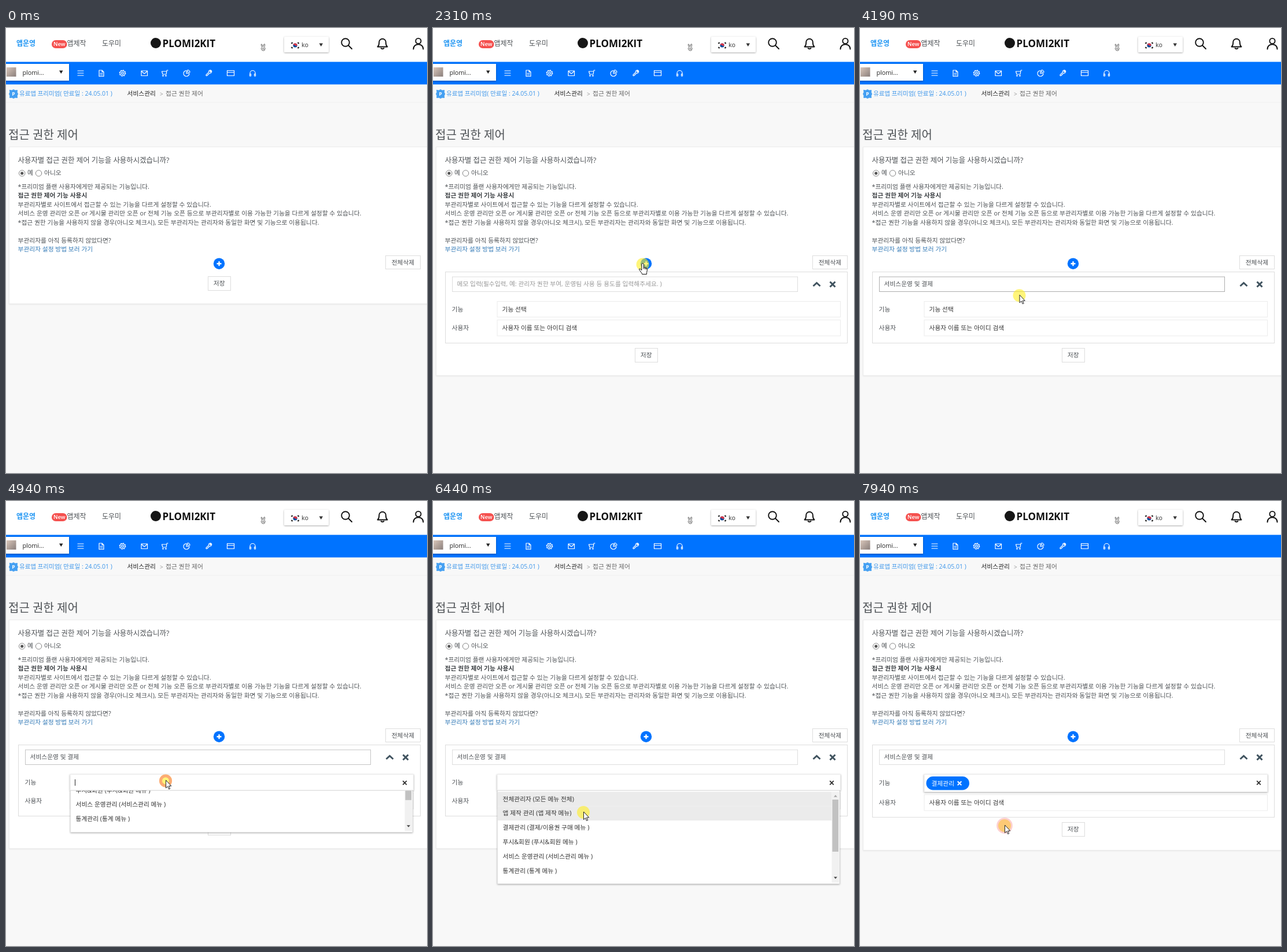
These frames come from a looping animation (728x769 px, 8 s). An HTML page:

```html
<!DOCTYPE html>
<html lang="ko">
<head>
<meta charset="utf-8">
<title>접근 권한 제어</title>
<style>
  html, body { margin: 0; width: 100%; height: 100%; overflow: hidden; background: #f8f8f8; }
  svg { display: block; width: 100%; height: 100%; }
  text { font: 10.74px "Open Sans", "Noto Sans CJK KR", "Noto Sans CJK JP", "Noto Sans KR", sans-serif; fill: #4c5054; white-space: pre; }
  .bold { font-weight: 700; fill: #3c4044; }
  .menu { font-size: 12px; }
  .blue { fill: #3d96ea; }
  .dark { fill: #333; }
  .hint { fill: #999; }
  .mid { text-anchor: middle; }
  .box { fill: #fff; stroke: #ddd; }
  .field { fill: #fff; stroke: #ececec; }
  .lift { filter: drop-shadow(0 1px 1.5px #0005); }
  .line { fill: none; stroke-linecap: round; stroke-linejoin: round; }
  .hover { fill: #ebebeb; }
</style>
</head>
<body>
<svg viewBox="0 0 728 769">
  <defs>
    <clipPath id="dropClip"><rect x="105" y="500.5" width="606" height="172"/></clipPath>
    <linearGradient id="thumb" x2="1" y2="1">
      <stop stop-color="#d9c6ba"/><stop offset="1" stop-color="#8a7f7c"/>
    </linearGradient>
  </defs>
  <rect width="728" height="769" fill="#f8f8f8"/>

  <!-- header -->
  <rect width="728" height="59" fill="#fff"/>
  <text class="menu" x="18" y="31" style="fill:#2196f3;font-weight:700">앱운영</text>
  <rect x="79" y="21" width="26.5" height="14" rx="7" fill="#f5504e"/>
  <text class="mid" x="92.2" y="31.4" style="font-size:9.5px;font-weight:600;fill:#fff">New</text>
  <text class="menu" x="105.5" y="31">앱제작</text>
  <text class="menu" x="166" y="31">도우미</text>
  <circle cx="259" cy="26" r="9" fill="#161616"/>
  <text x="270.5" y="32.5" style="font-size:17px;font-weight:700;fill:#111">PLOMI2KIT</text>
  <path class="line" stroke="#666" d="M442.500 33l-1.500-4.500q.8-1.200 1.800 0l1.700 4 1.500-4.500q1.200-.8 1.800.4l-1 5.100 1.500 1.500-1.500 4h-3.500l-2-3z M443 35.500l3-1.200 M444 37l2.500-.6"/>
  <rect class="lift" x="481" y="15" width="77" height="27" rx="1.5" fill="#fff"/>
  <circle cx="500" cy="30" r="3.6" fill="#0f4c9c"/>
  <path d="M496.4 30a3.6 3.6 0 0 1 7.2 0q-1.8 2-3.6 0t-3.6 0z" fill="#d34"/>
  <path stroke="#222" stroke-width="2.4" d="M493.5 27l2-2M504.5 25l2 2M493.5 33l2 2M504.5 35l2-2"/>
  <text class="dark" x="511" y="32.5">ko</text>
  <path d="M541.5 26.5h6.5l-3.25 5.5z" fill="#333"/>
  <g class="line" stroke="#111" stroke-width="1.9">
    <circle cx="587" cy="25" r="6.8"/><path d="M592 30l6 6"/>
    <path d="M642.5 32.500c3-2.500 2.500-5 2.700-8a5.800 5.800 0 0 1 11.600 0c.2 3-.3 5.500 2.700 8z M648.5 35q2.500 2 5 0"/>
    <circle cx="713" cy="22.5" r="4.6"/><path d="M704.5 36.5c0-11 17-11 17 0"/>
  </g>

  <!-- navigation bar -->
  <rect y="58.5" width="728" height="39" fill="#0073ff"/>
  <rect class="lift" x="-4" y="62" width="113" height="29" fill="#fff"/>
  <rect x="1" y="68" width="16.5" height="16" fill="url(#thumb)"/>
  <text x="28.5" y="80.5" style="fill:#222">plomi...</text>
  <path d="M92 73.5h6.5l-3.25 5.5z" fill="#222"/>
  <g class="line" stroke="#fff" stroke-width="1.2">
    <path d="M124 74h10M124 78h10M124 82h10"/>
    <path d="M161 73h5l3 3v7.5h-8zM166 73v3h3M163 78.5h4M163 81h4"/>
    <circle cx="201.5" cy="78" r="1.9"/><circle cx="201.5" cy="78" r="4.4"/>
    <circle cx="201.5" cy="78" r="5.3" stroke-dasharray="1.8 2.36" stroke-linecap="butt"/>
    <path d="M234 74h10.5v8.5h-10.5zM234 74.5l5.25 4.5 5.25-4.5"/>
    <path d="M280 73h-1.8l-1.2 7h-6l-1.5-5h8"/><circle cx="271.5" cy="82.5" r=".7"/><circle cx="276.5" cy="82.5" r=".7"/>
    <path d="M312 73.5a5 5 0 1 0 5 5h-5zM314 72.5a4 4 0 0 1 4 4h-4z"/>
    <path d="M346 81l4.5-4.5a3 3 0 0 1 4-3.5l-2 2 1 1 2-2a3 3 0 0 1-3.5 4l-4.5 4.5q-2 .5-1.5-1.5z"/>
    <path d="M382.5 73.5h12v9h-12zM382.5 76.5h12"/>
    <path d="M422 80v-2a4.5 4.5 0 0 1 9 0v2M421.5 79.5h2v3.5h-2zM429.5 79.5h2v3.5h-2z"/>
  </g>

  <!-- breadcrumb and title -->
  <path stroke="#f1f1f1" d="M0 128.5H728"/>
  <path class="line" d="M6.5 107.5q3.500 1.500 6.500-1 3 2.500 6.500 1-1.200 3.500 1 6.500-2.200 3-1 6.500-3.500-1.200-6.500 1-3-2.200-6.500-1 1.200-3.500-1-6.500 2.200-3 1-6.500z" style="fill:#45a0f2" stroke="#45a0f2"/>
  <text class="mid" x="13" y="117" style="font-size:8.5px;font-weight:700;fill:#fff">P</text>
  <text class="blue" x="23" y="117" style="font-size:10.5px">유료앱 프리미엄( 만료일 : 24.05.01 )</text>
  <text x="209.5" y="117" style="fill:#222">서비스관리</text>
  <text class="hint" x="266" y="117.5" style="font-size:10px">&gt;</text>
  <text x="276" y="117" style="fill:#666">접근 권한 제어</text>
  <text x="4" y="191.5" style="font-size:20px">접근 권한 제어</text>

  <!-- card -->
  <rect id="card" x="5.5" y="205.5" width="740" height="271" fill="#fff" stroke="#ececec" style="filter:drop-shadow(0 1px 1px #0001)"/>
  <text x="20.5" y="233.2" style="font-size:12.45px">사용자별 접근 권한 제어 기능을 사용하시겠습니까?</text>
  <g fill="#fff" stroke="#858585"><circle cx="27.7" cy="251" r="5.2"/><circle cx="56.5" cy="251" r="5.2"/></g>
  <circle cx="27.7" cy="251" r="2.6" fill="#555"/>
  <text x="37" y="253.5">예</text>
  <text x="66" y="253.5">아니오</text>
  <text x="20.5" y="277.5">*프리미엄 플랜 사용자에게만 제공되는 기능입니다.</text>
  <text class="bold" x="20.5" y="293.2">접근 권한 제어 기능 사용시</text>
  <text x="20.5" y="308.5">부관리자별로 사이트에서 접근할 수 있는 기능을 다르게 설정할 수 있습니다.</text>
  <text x="20.5" y="324">서비스 운영 관리만 오픈 or 게시물 관리만 오픈 or 전체 기능 오픈 등으로 부관리자별로 이용 가능한 기능을 다르게 설정할 수 있습니다.</text>
  <text x="20.5" y="339.5">*접근 권한 기능을 사용하지 않을 경우(아니오 체크시), 모든 부관리자는 관리자와 동일한 화면 및 기능으로 이용됩니다.</text>
  <text x="20.5" y="370.5">부관리자를 아직 등록하지 않았다면?</text>
  <text x="20.5" y="386" style="fill:#337ab7">부관리자 설정 방법 보러 가기</text>
  <circle cx="368.5" cy="407.2" r="9.7" fill="#0073ff"/>
  <path stroke="#fff" stroke-width="2.4" d="M364.5 407.2h8M368.5 403.2v8"/>
  <rect class="box" x="656.5" y="393.5" width="60" height="23"/>
  <text class="mid" x="686.5" y="409">전체삭제</text>

  <!-- permission panel -->
  <g id="panel">
    <rect id="frame" class="box" x="21.5" y="421.5" width="695" height="123"/>
    <rect id="memo" class="box" x="33.5" y="430" width="597" height="25.5"/>
    <text id="hint" class="hint" x="41.5" y="446.3">메모 입력(필수입력, 예: 관리자 권한 부여, 운영팀 사용 등 용도를 입력해주세요. )</text>
    <text id="value" x="41.5" y="446.3">서비스운영 및 결제</text>
    <rect id="memoCaret" y="437" width="1" height="11" fill="#222"/>
    <g fill="none" stroke="#40535f" stroke-width="3">
      <path d="M657.5 446l6-5.5 6 5.5M686.5 438.5l9 9M695.5 438.5l-9 9"/>
    </g>
    <text id="label" x="32.5" y="490">기능</text>
    <g id="userRow">
      <text x="32.5" y="522">사용자</text>
      <rect class="field" x="111" y="504.5" width="593.5" height="27.5"/>
      <text class="dark" x="119.5" y="522">사용자 이름 또는 아이디 검색</text>
    </g>
  </g>
  <g id="save">
    <rect class="box" x="349.5" y="429.5" width="39" height="24"/>
    <text class="mid" x="368.7" y="445">저장</text>
  </g>
  <g id="picker">
    <rect id="pickerBox" class="field" x="111" y="472.5" width="593.5" height="27"/>
    <text id="pickerHint" class="dark" x="119.5" y="490">기능 선택</text>
    <rect id="pickerCaret" x="119" y="481" width="1" height="11" fill="#222"/>
    <path id="clear" stroke="#333" stroke-width="1.9" d="M686.2 483.7l6.6 6.6M692.8 483.7l-6.6 6.6"/>
    <g id="chip">
      <rect x="114.5" y="476" width="74.5" height="23.5" rx="11.75" fill="#0073ff"/>
      <text x="123.5" y="491.5" style="fill:#fff">결제관리</text>
      <path stroke="#fff" stroke-width="2" d="M168.8 484.5l6.6 6.6M175.4 484.5l-6.6 6.6"/>
    </g>
  </g>
  <g id="menu" clip-path="url(#dropClip)"><g id="drop"></g></g>

  <!-- pointer -->
  <g id="pointer">
    <circle r="11" fill="#fe2" fill-opacity=".6"/>
    <circle id="ring" fill="none" stroke="#fa6e6e"/>
    <path id="arrow" fill="#fff" stroke="#222" stroke-linejoin="round" d="M.5-1v13.5l3.1-2.8 2.1 4.8 2-.9-2.1-4.6h4.2z"/>
    <g id="hand" fill="#fff" stroke="#111" stroke-linejoin="round">
      <path d="M-1.7 0a1.7 1.7 0 0 1 3.4 0v5l4.8 1.2q1.9.6 1.5 3l-1 4.8v3h-8l-.6-2-4.2-5.6q-.8-2.2 1.6-1.7l2.5 2.3z"/>
      <path d="M1.7 5v3M4.2 6v2.5M6.3 6.5v2.5"/>
    </g>
    <path id="beam" fill="none" stroke="#222" stroke-width="1.2" d="M-.5-6h2q.5 0 .5.5q0-.5.5-.5h2M2-5.5v11M-.5 6h2q.5 0 .5-.5q0 .5.5.5h2"/>
  </g>
</svg>
<script>
const $ = Object.fromEntries([...document.querySelectorAll('[id]')].map(el => [el.id, el]));
const LOOP = 8000, CLICK = 520, ITEM = 24.8, DROP_HEIGHT = 162;

const items = ['전체관리자 (모든 메뉴 전체)', '앱 제작 관리 (앱 제작 메뉴)', '결제관리 (결제/이용권 구매 메뉴 )',
  '푸시&amp;회원 (푸시&amp;회원 메뉴 )', '서비스 운영관리 (서비스관리 메뉴 )', '통계관리 (통계 메뉴 )'];
$.drop.innerHTML = `
  <rect class="lift" x="111.5" y="499.5" width="591.5" height="${DROP_HEIGHT}" fill="#fff" stroke="#ddd" stroke-width=".6"/>` +
  items.map((label, i) => `
  <rect class="hover" x="112" y="${502.5 + i * ITEM}" width="577.5" height="${ITEM}"/>
  <text class="dark" x="120.5" y="${518.5 + i * ITEM}">${label}</text>`).join('') + `
  <rect x="689.5" y="502.5" width="13" height="157" fill="#f1f1f1"/>
  <rect x="690.5" y="516" width="10.5" height="90" fill="#c1c1c1"/>
  <path d="M693 511.5h6l-3-3.5z" fill="#a3a3a3"/><path d="M693 649.5h6l-3 3.5z" fill="#444"/>`;
const hovers = $.drop.querySelectorAll('.hover');

// time, x, y
const path = [
  [310, 179, 477], [1060, 358, 407], [1130, 367, 406], [2250, 367, 406], [2690, 282, 454],
  [2820, 282, 454], [3000, 275, 440.5], [4070, 275, 440.5], [4310, 276, 483.5],
  [5880, 276, 483.5], [5940, 273.5, 486], [6440, 260, 538], [7190, 260, 538],
  [7310, 251, 560], [7500, 250, 561], [LOOP, 250, 561]];
const clicks = [1500, 3000, 4870, 7690];

const show = (el, on) => { el.style.display = on ? '' : 'none'; };
const within = (t, from, to) => t >= from && t < to;
const clamp = v => Math.min(1, Math.max(0, v));
const shift = (el, y) => el.setAttribute('transform', `translate(0 ${y})`);

function pointerAt(t) {
  const i = Math.max(1, path.findIndex(key => key[0] > t));
  const [t0, x0, y0] = path[i - 1], [t1, x1, y1] = path[i];
  const p = clamp((t - t0) / (t1 - t0)), e = p * p * (3 - 2 * p);
  return [x0 + (x1 - x0) * e, y0 + (y1 - y0) * e];
}

function drawPointer(t, x, y, panel) {
  show($.pointer, t >= 310);
  $.pointer.setAttribute('transform', `translate(${x} ${y})`);
  const onPlus = Math.hypot(x - 368.5, y - 407) < 10;
  const onMemo = panel && !onPlus && y > 430 && y < 456;
  show($.hand, onPlus);
  show($.beam, onMemo);
  show($.arrow, !onPlus && !onMemo);

  const start = clicks.find(c => within(t, c, c + CLICK));
  show($.ring, start !== undefined);
  if (start === undefined) return;
  const p = (t - start) / CLICK;
  const outer = 10 + 8 * p, inner = 6 * clamp((0.45 - p) / 0.25);
  $.ring.setAttribute('r', (outer + inner) / 2);
  $.ring.setAttribute('stroke-width', outer - inner);
  $.ring.setAttribute('stroke-opacity', 0.62 * (1 - p));
}

function draw(t) {
  const panel = t >= 1620, opened = t >= 4870, chosen = t >= 7810, typed = t >= 3690;
  const [x, y] = pointerAt(t);

  show($.panel, panel);
  show($.picker, panel);
  $.card.setAttribute('height', chosen ? 398 : panel ? 395 : 271);
  $.frame.setAttribute('height', chosen ? 125 : 123);
  shift($.save, chosen ? 126 : panel ? 124 : 0);
  shift($.userRow, chosen ? 3 : 0);
  shift($.label, chosen ? 1 : 0);

  const focus = clamp((t - 3000) / 150) * clamp((5020 - t) / 150);
  const grey = 221 - 48 * focus;
  $.memo.style.stroke = `rgb(${grey},${grey},${grey})`;
  show($.hint, !typed);
  show($.value, typed);
  show($.memoCaret, within(t, 3050, 3500) || within(t, 3690, 4190));
  $.memoCaret.setAttribute('x', typed ? 128 : 42);

  $.pickerBox.classList.toggle('lift', t >= 4220);
  $.pickerBox.setAttribute('height', chosen ? 30 : 27);
  show($.pickerHint, !opened);
  show($.clear, opened);
  show($.chip, chosen);
  show($.pickerCaret, within(t, 4870, 5380) || within(t, 5940, 6440) || within(t, 6940, 7500));

  show($.menu, opened && !chosen);
  shift($.drop, -DROP_HEIGHT * (1 - clamp((t - 4870) / 158)));
  const over = t < 5900 ? 0 : Math.floor((y - 502.5) / ITEM);
  hovers.forEach((el, i) => show(el, i === 0 || i === over));

  drawPointer(t, x, y, panel);
}

function tick() {
  draw(performance.now() % LOOP);
  requestAnimationFrame(tick);
}
tick();
</script>
</body>
</html>
```
